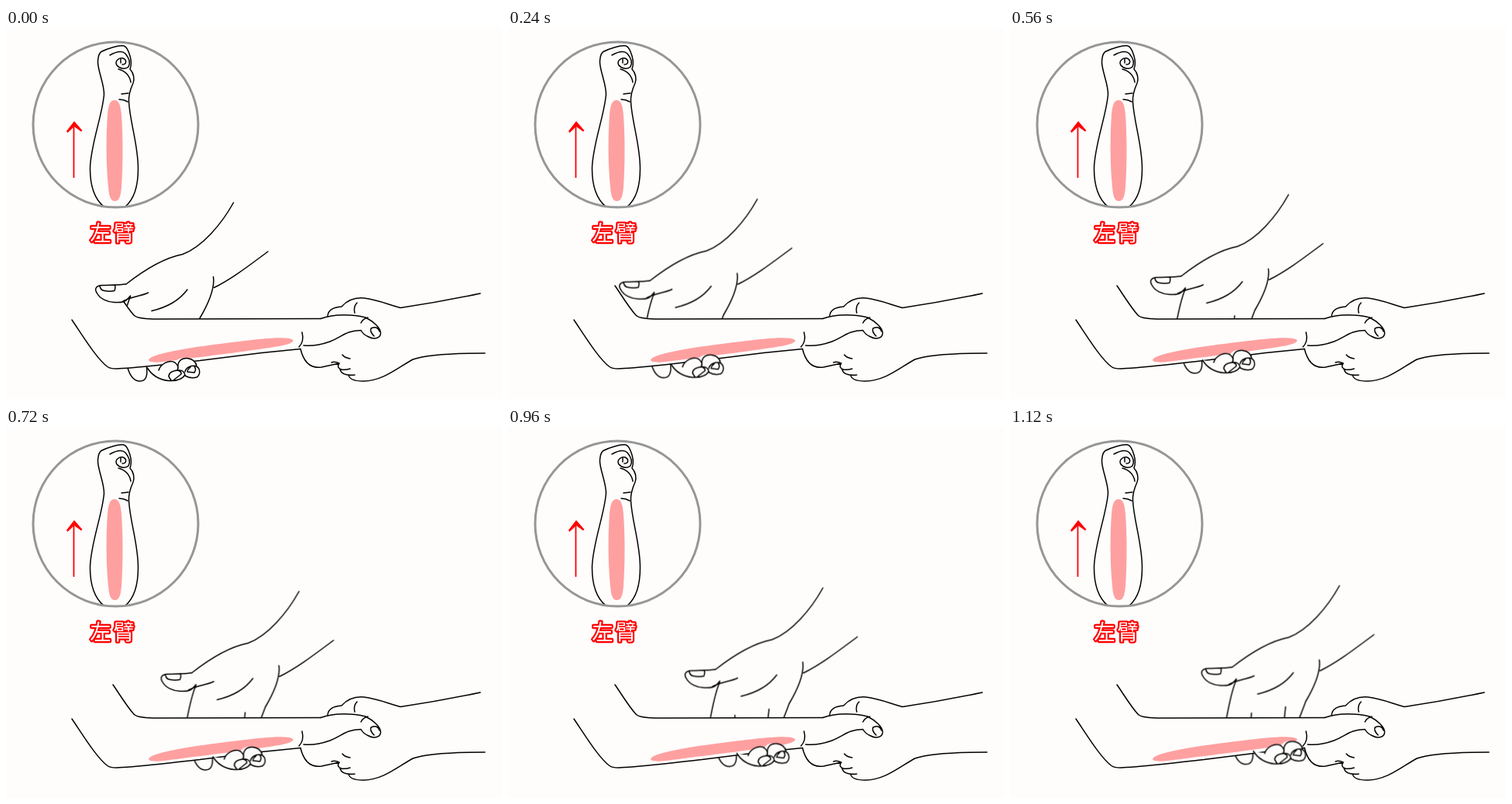
An HTML page that plays this animation: 640x478 px, repeating every 1.2 s.

```html
<!DOCTYPE html>
<html lang="zh">
<head>
<meta charset="utf-8">
<title>左臂</title>
<style>
  html, body { margin: 0; width: 100%; height: 100%; overflow: hidden; background: #fefdfc; }
  svg { display: block; width: 640px; height: 478px; }
  .ink { fill: none; stroke: #000; stroke-width: 1.5; stroke-linecap: round; stroke-linejoin: round; }
  .skin { fill: #fefdfc; stroke: none; }
  .zone { fill: #ffa0a0; }
  .label {
    font: 500 27px "Noto Sans CJK SC", "Noto Sans CJK", sans-serif;
    letter-spacing: 3px; fill: #fff; stroke: #f00; stroke-width: 4.4;
    stroke-linejoin: round; paint-order: stroke;
  }
  .slide { animation: slide 1200ms steps(15, end) infinite; }
  @keyframes slide {
    from { transform: translate(0, 0); }
    to { transform: translate(140.9px, -21.96px); }
  }
</style>
</head>
<body>
<svg viewBox="0 0 640 478">
  <!-- inset: forearm and direction -->
  <g class="ink">
    <path d="M126 230C113 219 108.500 202 108.500 181C109 151 124 114 126.500 86C127 72 118 54 118.500 43C119 38 119 33 123 30.500C132 26 145 22 152 23C156 24 158 29 160 36C162 43 162 48 160 53C165 58 166 66 164 71C160 80 158 87 158.500 95C160 122 170.500 150 170.500 181C170.500 203 166 220 154 230"/>
    <path d="M134 35C143 30 150 29 154 33C159 39 161 45 158 50C154 54 146 52 143 48C140 43 145 38 151 39C156 41 156 47 150 47M148 40V45M145 53C154 55 160 62 161 70M149 85L158 84M146 92Q152 92 157 95"/>
  </g>
  <path class="zone" d="M140 93C146 93 148 100 149 112C151 140 151 175 149 205C148 217 146 223 140.500 223C135 223 133 217 132 205C129 175 129 140 131 112C132 100 134 93 140 93Z"/>
  <circle cx="141.500" cy="124.500" r="106.500" fill="none" stroke="#969696" stroke-width="3"/>
  <path d="M87.500 193V125" fill="none" stroke="#f00" stroke-width="1.800"/>
  <path d="M88 120L98.500 132L97 133.500L88 127L79.500 135L78 133Z" fill="#f00"/>
  <text class="label" x="108.500" y="274">左臂</text>

  <!-- moving hand, behind the arm -->
  <g class="slide">
    <path class="ink" d="M293.500 225C278 253 253 282 228 291.500C205 296 178 312 155 330M338 288C315 305 292 323 268.500 334.500M267.500 320.500C270 337 260 357 250 374Q246 385 240 400M160.500 346C157 354 152 372 147 400M188 364.500C207 360 223 352 234 337M224 381L222 400M180 389L179 402"/>
    <path class="ink" d="M157 438C160 448 165 455 173 455C180 455 183 449 181.500 437"/>
  </g>

  <!-- resting arm -->
  <path class="skin" d="M138 332L163 367Q168 373 190 375L406 374.500L380 413L250 428.500L150 439Q137 440 132 437L85 376Z"/>
  <g class="ink">
    <path d="M138 332C147 345 156 360 165 370Q169 374.500 190 375L406 374.500"/>
    <path d="M85 376C100 398 117 426 131 436.500Q136 440 150 438.500C180 437 225 431 250 428.500L330 418.500L380 413.500"/>
  </g>
  <path class="zone" d="M184 427.500C188 419 240 411 300 404C332 400 361 397 370 401.500C373 406 360 409 340 412C300 418 250 424 215 428.500C200 431 184 432 184 427.500Z"/>

  <!-- holding hand -->
  <g class="ink">
    <path d="M406 374.500C424 368 448 369 464 373C474 378 483 386 483.500 393C483 400 475 402 467 397.500Q461 395 458 389.500C438 390 434 398 418 404C404 409 394 410 384 409M458 380Q460 375 467 373M482 391Q479 383 471 387Q469 391 475 397M382 392C384 400 382 407 378 411"/>
    <path d="M415 371C416 363 422 360 433 359C441 350 451 347 462 348C480 350 495 357 509 360.500Q560 353 612 342M453 354C449 358 449 363 450 367"/>
    <path d="M380 413.500C384 430 393 439 407 437L430 432Q424 429 420 431M430 432Q426 438 433 440Q438 441 444 439M431 440C433 447 440 448 450 447M434 421Q437 425 444 426M442 447C443 453 451 455 461 455C486 455 505 438 525 427C545 420 590 419 618 419"/>
  </g>

  <!-- moving thumb and fingertips, over the arm -->
  <g class="slide">
    <path class="skin" d="M155 330C148 331 138 331 124 331.500C116 332 114 336 117 341C121 349 131 353 140 353.500C149 354 154 354 161 345L170 338Z"/>
    <path class="ink" d="M155 330C148 331 138 331 124 331.500C116 332 114 336 117 341C121 349 131 353 140 353.500C149 354 154 354 160.500 345M151 352C162 346 173 346 183.500 341M121 332.500Q122 338 127 338.500Q134 340 140 338.500Q141.500 335 140.500 331"/>
    <path class="skin" d="M197 441C200 432 210 427 218 431C221 425 230 423 238 427Q246 429 246 436C251 439 251 447 246 450Q238 452 231 448C228 453 222 455 213 454.500C202 454 190 449 183 438Z"/>
    <path class="ink" d="M182.500 438C188 447 196 453 210 454.500C220 455 227 453 231 447M197 441C200 432 211 427 218 431Q224 436 221 441M222 438C221 430 226 425 234 425.500Q245 427 246 436M231 443C232 437 240 434 246 436C251 439 251 447 246 450Q238 452 231 448Q230 440 222 441Q210 442 210 449L213 454M222 441Q227 443 226 446L217 453M238 437Q234 440 234 443L243 444Q246 440 243 436"/>
  </g>
</svg>
</body>
</html>
```
